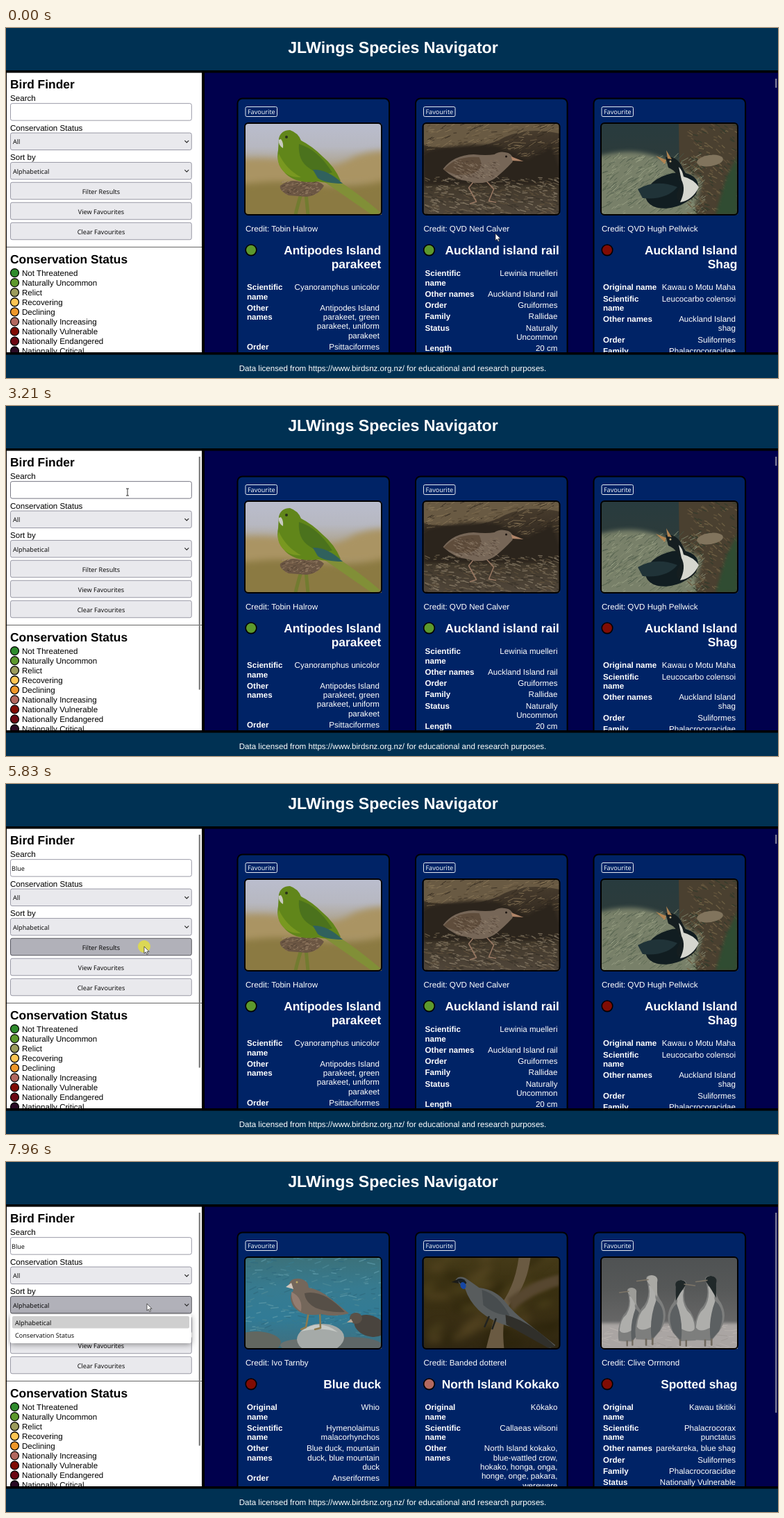
Recreate the animation shown at these times as an HTML page. Size 1112 px wide and 504 px high, loop 8 s.

```html
<!DOCTYPE html>
<html lang="en">
<head>
<meta charset="utf-8">
<title>Bird explorer</title>
<style>
  html, body { margin: 0; width: 100%; height: 100%; overflow: hidden; background: #00004d; }
  #stage { display: block; width: 1112px; height: 504px; }
  text { font: 11.6px "Liberation Sans", Arial, sans-serif; text-rendering: geometricPrecision; }
  .bold { font-weight: bold; }
  .h1 { font-size: 23.2px; font-weight: bold; }
  .h2 { font-size: 17.4px; font-weight: bold; }
  .ui { font: 9.15px "Open Sans", "Noto Sans", sans-serif; }
  .light text, text.light { fill: #fff; }
  .field rect { fill: #e9e9ed; stroke: #8f8f9d; stroke-width: .9; }
  .field.hover rect { fill: #d0d0d7; stroke: #676774; }
  .field.active rect { fill: #b1b1b9; stroke: #484851; }
  .field.input rect { fill: #fff; }
  .field.focus rect { stroke: #0060df; stroke-width: 1.6; }
</style>
</head>
<body>
<svg id="stage" viewBox="0 0 1112 504" xmlns="http://www.w3.org/2000/svg"></svg>
<script>
const LOOP = 8000, STEP = 80;
const stage = document.getElementById('stage');

// Markup helpers
const rect = (x, y, w, h, fill, extra = '') =>
  `<rect x="${x}" y="${y}" width="${w}" height="${h}" fill="${fill}" ${extra}/>`;
const text = (x, y, s, cls = '', anchor = 'start') =>
  `<text x="${x}" y="${y}" class="${cls}" text-anchor="${anchor}">${s}</text>`;
const path = (d, fill) => `<path d="${d}" fill="${fill}"/>`;
const line = (d, stroke, w) =>
  `<path d="${d}" fill="none" stroke="${stroke}" stroke-width="${w}" stroke-linecap="round"/>`;
const oval = (x, y, rx, ry, fill, turn = 0) =>
  `<ellipse cx="${x}" cy="${y}" rx="${rx}" ry="${ry}" fill="${fill}" transform="rotate(${turn} ${x} ${y})"/>`;
const dot = (x, y, r, fill, w) =>
  `<circle cx="${x}" cy="${y}" r="${r}" fill="${fill}" stroke="#000" stroke-width="${w}"/>`;
const soft = (radius, inner) => `<g style="filter:blur(${radius}px)">${inner}</g>`;

let gradients = 0;
function backdrop(...colors) {
  const id = 'g' + gradients++;
  const stops = colors.map((c, i) => `<stop offset="${i / (colors.length - 1)}" stop-color="${c}"/>`);
  return `<linearGradient id="${id}" x2="0" y2="1">${stops.join('')}</linearGradient>` +
    rect(0, 0, 196, 131, `url(#${id})`);
}

// Scattered short strokes for leaves, grass and ripples
function specks(seed, count, [x, y, w, h], colors, len, slope, width = 1) {
  const random = () => (seed = (seed * 16807) % 2147483647) / 2147483647;
  let out = '';
  for (let i = 0; i < count; i++) {
    const px = x + random() * w, py = y + random() * h, l = len * (0.4 + random());
    const dy = l * (slope + (random() - 0.5) * 0.8);
    out += line(`M${px.toFixed(1)} ${py.toFixed(1)}l${l.toFixed(1)} ${dy.toFixed(1)}`,
      colors[Math.floor(random() * colors.length)], width);
  }
  return `<g opacity=".75">${out}</g>`;
}

const shag = (x, y, s, head) => `<g transform="translate(${x} ${y}) scale(${s * 1.25} ${s})">` +
  path('M-2 8Q-5 1 2 0Q10 0 9 10Q7 26 14 36Q23 56 12 76L4 88L-14 87Q-17 64-8 45Q3 32-2 8Z', '#7d7e7d') +
  path('M0 14Q9 16 7 30Q11 46 3 70Q-9 78-13 70Q-12 52-4 44Q3 30 0 14Z', '#aeaeab') +
  path('M8 34Q21 48 12 75L3 88Q0 60 8 34Z', '#5c6062') +
  path('M-2 8Q-4 1 3 0Q11 1 9 10L9 30Q4 18-2 8Z', head) +
  line('M-1 6L-13 8', '#7d7568', 1.6) + line('M-3 87v8M4 86v8', '#70695f', 2) + '</g>';

const photos = {
  parakeet: () => backdrop('#babdcd', '#b7b8c1', '#ac9f83', '#98844e', '#88783f') +
    soft(5, path('M-9 51Q40 46 82 58T155 48Q180 38 205 39V85H-9Z', '#aa9463') +
      path('M-9 88Q55 78 100 88T205 80V140H-9Z', '#8b7a42')) +
    line('M81 98Q75 117 72 131M87 100L90 131', '#727c30', 5) +
    path('M50 89Q64 78 80 84Q104 79 113 89Q105 103 88 105L62 103Q48 96 50 89Z', '#6b5643') +
    specks(31, 90, [52, 83, 52, 20], ['#8c7259', '#4c3d30', '#a58d72'], 3, -0.3) +
    path('M116 73Q143 84 195 128L182 131Q143 104 107 79Z', '#818f37') +
    path('M48 21Q51 9 64 9Q76 13 80 24Q96 32 111 47Q128 61 137 82Q121 87 104 83Q74 87 58 72Q43 56 47 38Z', '#61861a') +
    path('M77 29Q104 37 125 70Q106 75 92 64Q75 53 77 29Z', '#4b721d') +
    path('M48 43Q58 65 80 77Q61 78 51 64Q44 53 48 43Z', '#799820') +
    path('M97 66Q118 65 140 86Q115 86 104 78Z', '#30615d') +
    path('M51 22Q55 27 54 35Q47 31 48 23Z', '#c8cac0') + oval(59, 19, 2, 2, '#28311b'),
  rail: () => backdrop('#4c4030', '#352c22', '#40372a', '#50463a') +
    path('M0 0H196V14Q150 4 117 19Q74 44 0 31Z', '#695a43') +
    specks(7, 240, [0, 0, 196, 49], ['#806e51', '#2e261d', '#51432f', '#927e5d'], 7, -0.3) +
    soft(2, path('M0 42Q40 27 105 31L150 51L185 31L196 64V88H0Z', '#2b241c')) +
    specks(19, 400, [0, 77, 196, 53], ['#776a55', '#928570', '#363027', '#62533e'], 6, 0.2, 1.3) +
    line('M73 82L65 92L76 112M90 82L101 94L94 111M76 112l-9 3M94 111l10 2', '#977762', 1.6) +
    path('M28 65Q43 45 72 44Q91 46 102 44Q110 38 122 42Q131 46 128 55Q115 69 102 79Q83 90 62 82Q45 81 28 65Z', '#766657') +
    path('M29 66Q47 45 80 48Q89 65 69 72Q48 77 29 66Z', '#5f4d3c') +
    specks(41, 130, [43, 52, 62, 25], ['#92826f', '#4c3c30', '#83705d'], 4, 0.4) +
    path('M126 47L144 54L128 53Z', '#b08568') + oval(119, 47, 1.5, 1.5, '#1c1511'),
  nestShag: () => backdrop('#283b3e', '#2c3b3b', '#56604b', '#6c755b') +
    path('M111 0H196V131H137Q129 89 112 66Z', '#4a4030') +
    soft(3, path('M-9 48Q55 28 105 59L143 80Q140 115 123 140H-9Z', '#788069')) +
    specks(53, 420, [0, 48, 145, 83], ['#a0a78b', '#58664f', '#8c9478', '#4b5949'], 6, -0.7) +
    specks(82, 210, [123, 0, 73, 130], ['#66563e', '#313a2b', '#786849'], 5, 0.6, 1.4) +
    oval(156, 53, 19, 8, '#81745d', -8) + soft(2, path('M179 79L196 45V131H164Z', '#304c32')) +
    oval(101, 96, 39, 24, '#111d21', -18) +
    path('M92 48Q105 45 114 58Q123 79 138 89Q140 107 116 114Q101 109 114 88Q111 69 96 63Z', '#151e20') +
    path('M111 62Q116 66 118 76Q133 80 140 91Q131 110 113 113Q122 94 115 81Z', '#d6d7cf') +
    path('M52 94Q78 79 109 91Q94 110 59 107Z', '#203338') +
    path('M93 52L78 46L91 58ZM95 50L93 38L101 51Z', '#b18452') + oval(99, 54, 1.5, 1.5, '#bba980'),
  duck: () => backdrop('#3b717a', '#377b90', '#317b96', '#416e7c') +
    specks(67, 250, [0, 0, 196, 112], ['#4d8996', '#306b7f', '#5b98a7', '#397a8c'], 8, -0.1, 1.5) +
    oval(15, 122, 36, 16, '#626760') + oval(80, 126, 30, 9, '#69716f') + oval(151, 128, 48, 14, '#5e6767') +
    oval(108, 116, 34, 21, '#a5aaa8', -4) + path('M80 106Q106 86 133 107Q111 99 80 106Z', '#c6cac6') +
    line('M91 78L87 100M107 78L108 101M87 100l-7 3M108 101l-8 2', '#8e7a4d', 2.5) +
    path('M63 37Q66 28 79 30Q91 33 91 43Q106 45 123 59L149 80Q130 86 109 81Q82 86 69 70Q61 56 69 47Z', '#74675b') +
    path('M85 51Q112 45 143 78Q118 79 101 72Q86 64 85 51Z', '#564f47') +
    path('M66 49Q83 57 80 77Q66 69 66 49Z', '#937d71') +
    path('M66 36L58 42L69 45Z', '#d2c6bb') + oval(74, 35, 1.5, 1.5, '#c0ac62') +
    oval(179, 98, 23, 15, '#49443e', 18) + oval(159, 87, 9, 8, '#5a5147') + path('M152 88l-6 5 9 0Z', '#b7aa98'),
  kokako: () => backdrop('#453a18', '#3a3011', '#392e13', '#302711') +
    soft(6, specks(94, 40, [0, 0, 196, 130], ['#53471f', '#292209', '#5b4a25'], 28, -0.4, 9)) +
    path('M137 0H154Q149 36 132 58Q110 75 116 131H90Q99 94 106 74Q131 45 137 0Z', '#6a5a42') +
    soft(2, path('M121 59Q158 32 196 24V40Q155 50 128 77Z', '#574730')) +
    path('M46 32Q50 25 60 29Q69 35 80 43Q105 46 119 65Q131 80 146 91L190 126L182 130L128 100Q97 92 79 75Q65 61 60 45Z', '#585c5d') +
    path('M84 46Q108 53 124 83Q102 82 86 68Z', '#474c4e') +
    path('M118 82Q153 91 190 128L180 130L119 96Z', '#302f2a') +
    path('M48 31Q57 27 62 36Q58 42 52 36Z', '#191f22') + oval(57, 40, 4, 5, '#1647a6', -20) +
    path('M49 31L40 35L51 37Z', '#1b1b18') + line('M94 85L88 99M104 88L99 102', '#22231f', 2.5),
  shags: () => backdrop('#4f5253', '#565858', '#656565', '#7c7b79') +
    soft(2, rect(-9, 94, 214, 46, '#aaa5a3')) +
    specks(103, 110, [0, 98, 196, 33], ['#b9b3af', '#9b9692', '#c0bab5'], 11, 0) +
    shag(40, 43, .88, '#9c9c98') + shag(68, 25, 1.06, '#aaa9a4') +
    `<g transform="translate(238 0) scale(-1 1)">${shag(120, 32, 1, '#202829')}</g>` +
    shag(153, 26, 1.06, '#202829'),
};

const GREEN = '#5d992d', DARK_RED = '#800c04', ROSE = '#b2685f';
const card = (photo, credit, color, title, rows) => ({ photo, credit, color, title, rows });
// Each row is "label:value"; "/" breaks a line.
const allBirds = [
  card('parakeet', 'Tobin Halrow', GREEN, 'Antipodes Island/parakeet', [
    'Scientific/name:Cyanoramphus unicolor',
    'Other/names:Antipodes Island/parakeet, green/parakeet, uniform/parakeet',
    'Order:Psittaciformes']),
  card('rail', 'QVD Ned Calver', GREEN, 'Auckland island rail', [
    'Scientific/name:Lewinia muelleri', 'Other names:Auckland Island rail', 'Order:Gruiformes',
    'Family:Rallidae', 'Status:Naturally/Uncommon', 'Length:20 cm']),
  card('nestShag', 'QVD Hugh Pellwick', DARK_RED, 'Auckland Island/Shag', [
    'Original name:Kawau o Motu Maha', 'Scientific/name:Leucocarbo colensoi',
    'Other names:Auckland Island/shag', 'Order:Suliformes', 'Family:Phalacrocoracidae']),
];
const blueBirds = [
  card('duck', 'Ivo Tarnby', DARK_RED, 'Blue duck', [
    'Original/name:Whio', 'Scientific/name:Hymenolaimus/malacorhynchos',
    'Other/names:Blue duck, mountain/duck, blue mountain/duck', 'Order:Anseriformes']),
  card('kokako', 'Banded dotterel', ROSE, 'North Island Kokako', [
    'Original/name:Kōkako', 'Scientific/name:Callaeas wilsoni',
    'Other/names:North Island kokako,/blue-wattled crow,/hokako, honga, onga,/honge, onge, pakara,/werewere']),
  card('shags', 'Clive Orrmond', DARK_RED, 'Spotted shag', [
    'Original/name:Kawau tikitiki', 'Scientific/name:Phalacrocorax/punctatus',
    'Other names:parekareka, blue shag', 'Order:Suliformes', 'Family:Phalacrocoracidae',
    'Status:Nationally Vulnerable']),
];

function drawCard({ photo, credit, color, title, rows }, i) {
  const titles = title.split('/');
  let y = 357.4 + (titles.length - 1) * 19.9, table = '';
  for (const row of rows) {
    const [left, right] = row.split(':').map(s => s.split('/'));
    left.forEach((s, n) => table += text(347, y + n * 13.3, s, 'bold'));
    right.forEach((s, n) => table += text(538, y + n * 13.3, s, '', 'end'));
    y += Math.max(left.length, right.length) * 13.3 + 2.9;
  }
  return `<g class="light" transform="translate(${i * 256.5} 0)">` +
    rect(333.5, 101.5, 218.6, 400, '#002366', 'stroke="#000" stroke-width="2" rx="7"') +
    rect(345, 113.5, 45.5, 14, 'none', 'stroke="#e4e7ef" rx="2"') +
    text(367.8, 124, 'Favourite', 'ui', 'middle') +
    `<svg x="345" y="138" width="196" height="131">${photos[photo]()}</svg>` +
    rect(344, 137, 197, 132, 'none', 'stroke="#000" stroke-width="2" rx="5"') +
    text(345, 293, 'Credit: ' + credit) + dot(353, 319.8, 7.8, color, 1.6) +
    titles.map((s, n) => text(540.3, 326 + n * 19.9, s, 'h2', 'end')).join('') + table + '</g>';
}

const FIELD_W = 261.7, FIELD_H = 25.4;
const fields = [
  { y: 108.2, kind: 'input' }, { y: 150.6, label: 'All', kind: 'select' },
  { y: 193, label: 'Alphabetical', kind: 'select' }, { y: 221.8, label: 'Filter Results' },
  { y: 250.8, label: 'View Favourites' }, { y: 279.8, label: 'Clear Favourites' },
];
const [INPUT, , SORT, FILTER] = fields.keys();

function drawField({ y, label, kind }) {
  const box = rect(6.5, y + .45, FIELD_W - .9, FIELD_H - .9, '', 'rx="2.5"');
  const inside = kind === 'input' ? '<text id="query" class="ui" x="8" y="125"></text>'
    : kind === 'select' ? text(10, y + 16.7, label, 'ui') + line(`M257.7 ${y + 11.7}l2.6 2.6 2.6-2.6`, '#222', 1.1)
    : text(137, y + 16.7, label, 'ui', 'middle');
  return `<g class="field ${kind || ''}">${box}${inside}</g>`;
}

const legend = [
  ['Not Threatened', '#2e8b2c'], ['Naturally Uncommon', GREEN], ['Relict', '#9b9b5c'],
  ['Recovering', '#ffc553'], ['Declining', '#ef9729'], ['Nationally Increasing', ROSE],
  ['Nationally Vulnerable', DARK_RED], ['Nationally Endangered', '#6b0813'], ['Nationally Critical', '#290a24'],
].map(([name, color], i) =>
  dot(12.5, 352.6 + i * 14.05, 6, color, 1.3) + text(23, 356.9 + i * 14.05, name)).join('');

stage.innerHTML =
  rect(0, 0, 1112, 504, '#00004d') +
  `<g id="all">${allBirds.map(drawCard).join('')}</g><g id="blue">${blueBirds.map(drawCard).join('')}</g>` +
  '<rect id="mainBar" x="1108.4" y="73" width="1.6" fill="#a3a3b5"/>' +
  rect(0, 64, 286, 404, '#000') + rect(1, 64, 281, 404, '#fff') +
  text(6, 87.3, 'Bird Finder', 'h2') + text(6, 105.4, 'Search') +
  text(6, 147.7, 'Conservation Status') + text(6, 190, 'Sort by') +
  fields.map(drawField).join('') +
  rect(1, 315, 281, 1, '#666') + text(6, 339, 'Conservation Status', 'h2') + legend +
  rect(277.7, 73, 2.3, 335.5, '#808080', 'id="sideBar"') +
  `<g id="popup"><g style="filter:drop-shadow(0 2px 4px #0006)">${rect(6, 219.5, 261, 41.5, '#fff', 'rx="3"')}</g>` +
  rect(9, 222, 255, 17.5, '#cfcfcf', 'rx="2"') + text(13, 234.6, 'Alphabetical', 'ui') +
  text(13, 252.6, 'Conservation Status', 'ui') + '</g>' +
  rect(0, 0, 1112, 64.5, '#000') + rect(0, 0, 1112, 61, '#003153') +
  text(557.5, 36, 'JLWings Species Navigator', 'h1 light', 'middle') +
  rect(0, 467, 1112, 37, '#000') + rect(0, 470.5, 1112, 34, '#003153') +
  text(557, 493.7, 'Data licensed from https://www.birdsnz.org.nz/ for educational and research purposes.', 'light', 'middle') +
  '<g id="pointer"><circle id="halo" r="9" fill="#e6e13c" fill-opacity=".8"/>' +
  '<path id="arrow" d="M0 0V10L2.3 7.9L3.9 11.4L5.5 10.7L4 7.3H7.1Z" fill="#fff" stroke="#222" stroke-width=".7"/>' +
  '<path id="beam" d="M-2-5H2M0-5V5M-2 5H2" fill="none" stroke="#333"/></g>';

const el = id => document.getElementById(id);
const show = (id, on) => el(id).setAttribute('visibility', on ? 'visible' : 'hidden');
const boxes = [...document.querySelectorAll('.field')];

// Pointer moves: start time, number of steps, destination, easing
const smooth = k => k * k * (3 - 2 * k);
const easeOut = k => 1 - (1 - k) ** 3;
const moves = [
  [70, 1, 705, 291, smooth], [340, 5, 549, 259, smooth], [890, 7, 387, 270, smooth],
  [1530, 11, 190.5, 238.5, smooth], [2410, 11, 175, 124, smooth], [3290, 2, 174.5, 117, smooth],
  [5040, 1, 174, 120, smooth], [5120, 6, 199, 234, easeOut], [5990, 4, 204, 234.6, smooth],
  [6700, 11, 203, 205, smooth], [7560, 1, 203, 204, smooth],
];
function pointerAt(t) {
  let x = 705, y = 296;
  for (const [start, steps, toX, toY, ease] of moves) {
    if (t < start) break;
    const k = ease(Math.min(1, (Math.floor((t - start) / STEP) + 1) / steps));
    x += (toX - x) * k;
    y += (toY - y) * k;
  }
  return [x, y];
}

const keyTimes = [3930, 4250, 4330, 4410];
const clicks = [[3530, 3770], [5830, 5990], [7800, 7960]];
const within = (t, [from, to]) => t >= from && t < to;

function render(t) {
  const [x, y] = pointerAt(t);
  const hovered = fields.findIndex(f => x >= 6 && x <= 6 + FIELD_W && y >= f.y && y <= f.y + FIELD_H);
  const pressed = within(t, clicks[1]) ? FILTER : t >= 7800 ? SORT : -1;
  const filtered = t >= 6070, hidden = within(t, [3930, 5040]);

  boxes.forEach((box, i) => {
    box.classList.toggle('hover', i === hovered);
    box.classList.toggle('active', i === pressed);
    box.classList.toggle('focus', i === INPUT && within(t, [3530, 5830]));
  });
  el('query').textContent = 'Blue'.slice(0, keyTimes.filter(k => t >= k).length);
  show('all', !filtered);
  show('blue', filtered);
  show('sideBar', t >= 1930);
  show('popup', t >= 7880);
  el('mainBar').setAttribute('height', filtered ? 288 : 13);
  el('pointer').setAttribute('transform', `translate(${x} ${y})`);
  show('arrow', !hidden && hovered !== INPUT);
  show('beam', !hidden && hovered === INPUT);
  show('halo', clicks.some(c => within(t, c)));
}

const start = performance.now();
function tick() {
  render((performance.now() - start) % LOOP);
  requestAnimationFrame(tick);
}
tick();
</script>
</body>
</html>
```
